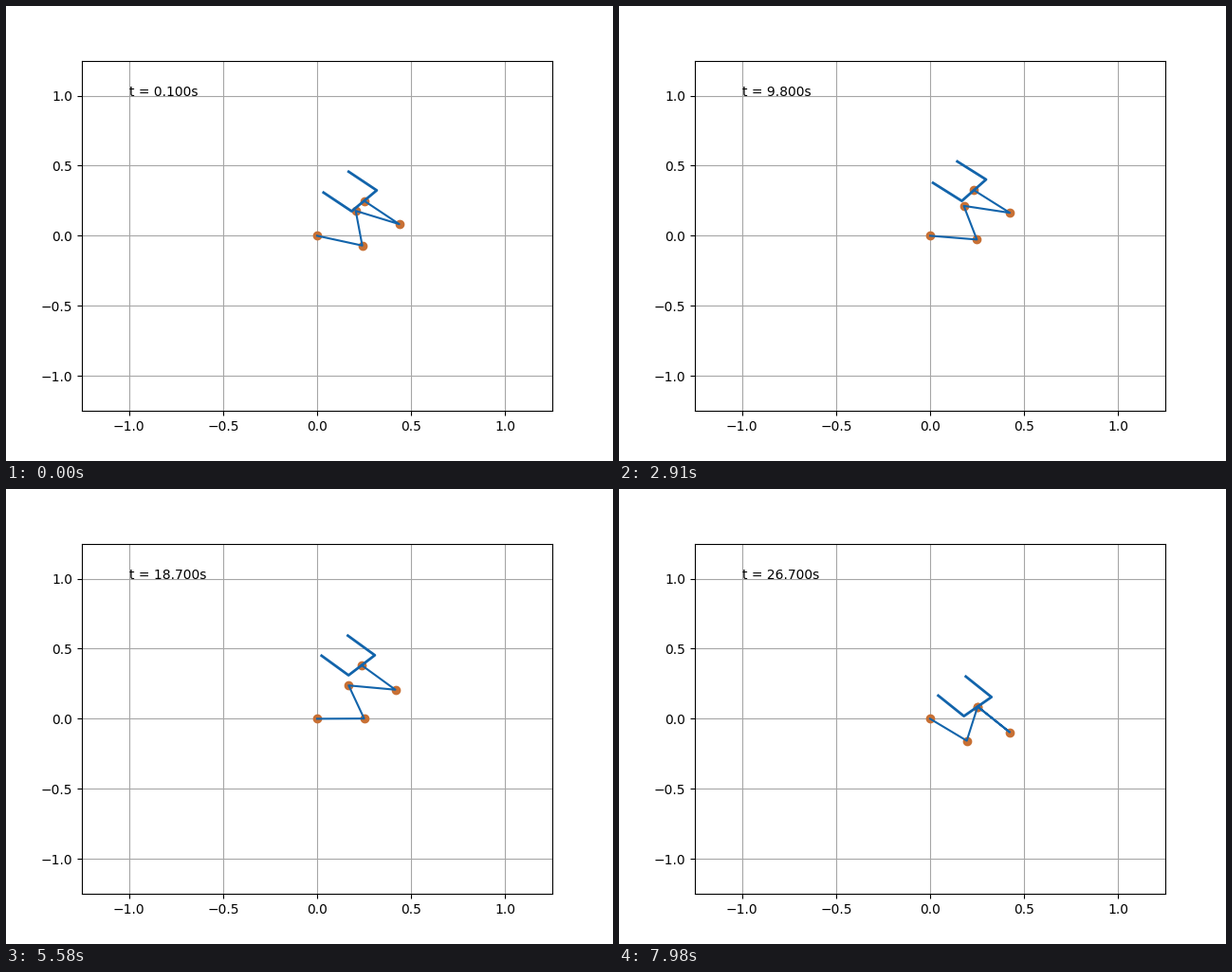
A matplotlib script that plays this animation: 640 px wide and 480 px high, repeating every 8 s.

```python
import matplotlib.pyplot as plt
import numpy as np
from matplotlib.animation import FuncAnimation

FRAMES = 267
LOOP_MS = 8000
LINK = 0.25
GRIP = 0.2
BLUE = "#1264ab"
ORANGE = "#c87034"

# Joint angles at the start, each relative to the link before it
START = np.radians([-16.2, 114.2, -120.3, 160.5])

# Places the hand passes through: time in seconds, x, y
WAYPOINTS = [
    (0.1, 0.250, 0.249),
    (6.7, 0.423, 0.225),
    (9.8, 0.233, 0.325),
    (15.0, 0.244, 0.250),
    (18.7, 0.237, 0.382),
    (21.9, 0.339, 0.286),
    (26.7, 0.253, 0.087),
]


def clock_time(i):
    return (i + 1) / 10


def hand_target(t):
    for (t0, *a), (t1, *b) in zip(WAYPOINTS, WAYPOINTS[1:]):
        if t <= t1:
            break
    s = (t - t0) / (t1 - t0)
    ease = s * s * (3 - 2 * s)
    return np.array(a) + ease * np.subtract(b, a)


def arm_points(q):
    heading = np.cumsum(q)
    steps = LINK * np.column_stack([np.cos(heading), np.sin(heading)])
    return np.vstack([[0, 0], np.cumsum(steps, axis=0)])


def follow(q, target):
    """Smallest joint change that brings the hand to the target."""
    pts = arm_points(q)
    reach = pts[-1] - pts[:-1]
    jacobian = np.array([-reach[:, 1], reach[:, 0]])
    return q + np.linalg.pinv(jacobian) @ (target - pts[-1])


def grip_points(tip, heading):
    ahead = GRIP * np.array([np.cos(heading), np.sin(heading)])
    side = np.array([-ahead[1], ahead[0]]) / 2
    left, right = tip + side, tip - side
    return np.array([left + ahead, left, right, right + ahead])


poses = [START]
for i in range(1, FRAMES):
    poses.append(follow(poses[-1], hand_target(clock_time(i))))

fig, ax = plt.subplots(figsize=(6.4, 4.8), dpi=100)
ax.set_xlim(-1.25, 1.25)
ax.set_ylim(-1.25, 1.25)
ax.grid(True, color="#a6a6a6")

joints, = ax.plot([], [], "o", color=ORANGE, ms=6)
arm, = ax.plot([], [], color=BLUE, lw=1.5)
grip, = ax.plot([], [], color=BLUE, lw=2)
clock = ax.text(-1, 1, "")


def draw(i):
    q = poses[i]
    pts = arm_points(q)
    joints.set_data(*pts.T)
    arm.set_data(*pts.T)
    grip.set_data(*grip_points(pts[-1], q.sum()).T)
    clock.set_text(f"t = {clock_time(i):.3f}s")
    return joints, arm, grip, clock


anim = FuncAnimation(fig, draw, frames=FRAMES, interval=LOOP_MS / FRAMES,
                     repeat=True, repeat_delay=0)
plt.show()
```
